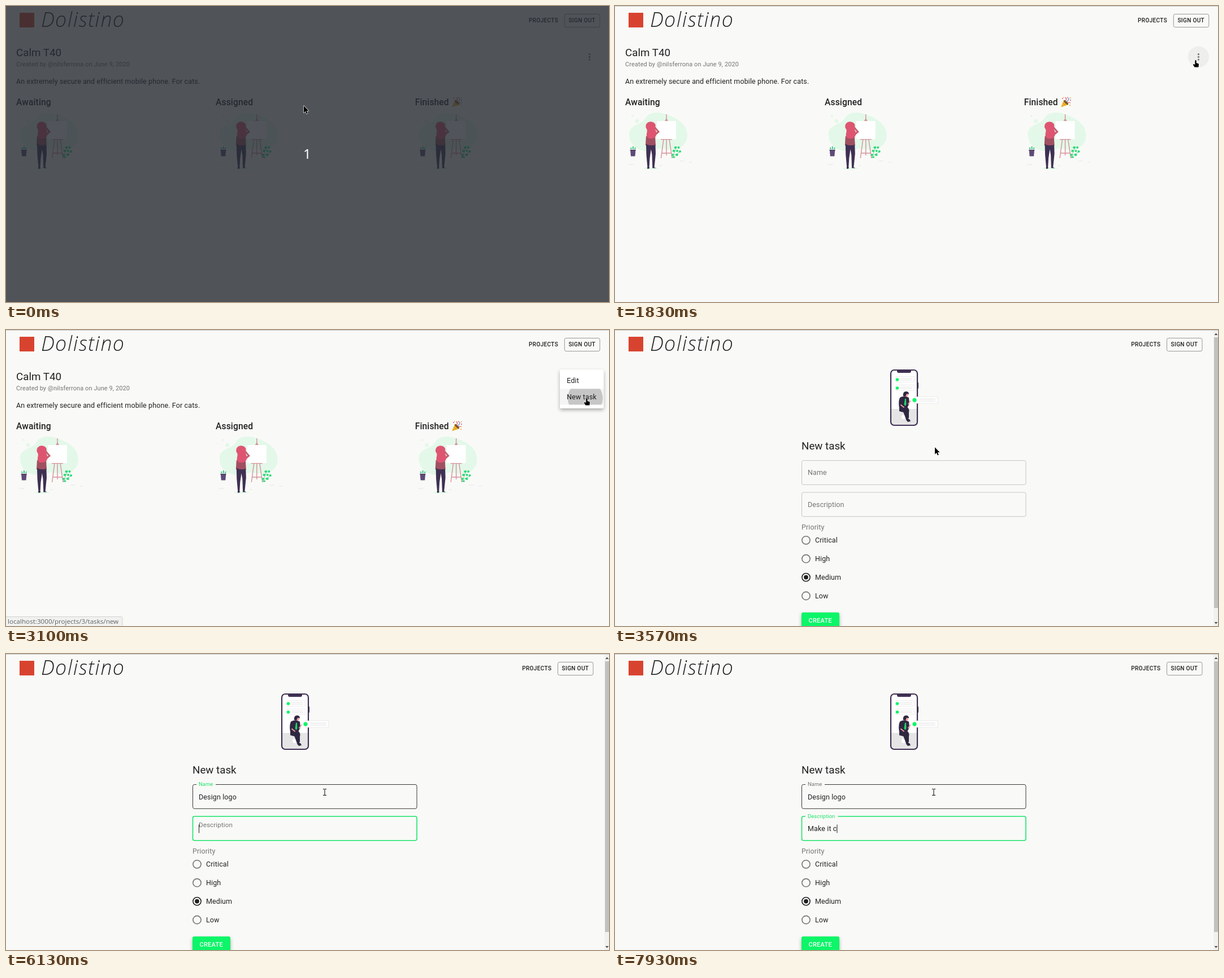
An HTML page that plays this animation: 1067 by 525 pixels, repeating every 8 s.

```html
<!DOCTYPE html>
<html lang="en">
<head>
<meta charset="utf-8">
<title>Task board</title>
<style>
  html, body { margin: 0; width: 100%; height: 100%; overflow: hidden; background: #f9faf7; }
  svg { display: block; width: 1067px; height: 525px; }
  text { font: 12.5px Roboto, sans-serif; letter-spacing: .00938em; fill: #212121; white-space: pre; }
  .h5 { font-size: 18.75px; letter-spacing: 0; }
  .h6 { font-size: 15.6px; font-weight: 500; letter-spacing: .0075em; }
  .small { font-size: 10.94px; letter-spacing: .01071em; }
  .btn { font-size: 10.15px; font-weight: 500; letter-spacing: .02857em; }
  .grey { fill: #757575; }
  .brand { font: italic 300 36px "Open Sans", sans-serif; letter-spacing: .045em; }
  .link { font: 11.67px "Open Sans", sans-serif; letter-spacing: 0; fill: #5f6266; }
</style>
</head>
<body>
<svg viewBox="0 0 1067 525">
  <defs>
    <clipPath id="itemClip"><rect x="980" y="104.3" width="77.5" height="28.2"/></clipPath>
    <filter id="shadow" x="-20%" y="-20%" width="140%" height="150%">
      <feDropShadow dx="0" dy="3" stdDeviation="3" flood-opacity=".32"/>
    </filter>

    <g id="artist">
      <path fill="#e3f8e9" d="M25 229C24 209 45 213 54 199C59 189 74 187 87 191C108 197 128 209 128 229C128 249 110 258 90 254C72 250 66 259 52 257C37 254 26 246 25 229Z"/>
      <g fill="#e3f8e9"><circle cx="39" cy="204" r="3.5"/><circle cx="31" cy="195" r="2"/><circle cx="20" cy="201" r="1"/></g>
      <path stroke="#e4e6e5" d="M24 281h9M114 275h8M131 277h5M78 283h5"/>
      <ellipse cx="64" cy="288" rx="14" ry="1.6" fill="#e3f8e9"/>
      <g stroke="#d6929a" stroke-width="1.4" fill="none">
        <path d="M91 192V265M86 236L81.500 270M96 236L101 270M83 261H99M81 236.500H101"/>
      </g>
      <path fill="#d6929a" d="M88 204L91 199L94 204Z"/>
      <rect x="74" y="204" width="34" height="32" fill="#fff"/>
      <path fill="#9f5061" d="M55 231Q63 228 71 231L72 247Q63 250 54 247Z"/>
      <path fill="none" stroke="#c2606f" stroke-width="3" stroke-linecap="round" d="M70 229L77 223L70 215"/>
      <path fill="#3f3053" d="M55 245Q63 249 71.500 246L72 262L69.500 287H66.300L65.500 264L63.800 254L61.500 270L60.500 287H57.500L55.500 264Z"/>
      <path fill="#2f2e41" d="M57 286h3.500l.5 2l-3.500 1zM66 286h3.500l3 1.500h-6z"/>
      <path fill="#de5571" d="M54.500 213C55 204 67 203 71 209C73 213 70 217 72 221C75 226 73 233 67 235Q61 236 58 234C53 229 59 222 56 218Q54 216 54.500 213Z"/>
      <path fill="#5d4a78" d="M27 255h9.500l-1 11.500h-7.500z"/>
      <path stroke="#3f3053" d="M26.500 255.500h10.500"/>
      <path stroke="#3ec487" stroke-width="2" d="M29 254l-1-3M32 254v-5M35 254l1-3"/>
      <path fill="none" stroke="#43cf81" stroke-width=".8" d="M102 269Q105 259 109 249M104 265L115 259"/>
      <g fill="#2fd878">
        <ellipse cx="107" cy="251" rx="2.500" ry="2"/><ellipse cx="112.500" cy="251" rx="2" ry="2"/>
        <ellipse cx="104" cy="257" rx="2.500" ry="2"/><ellipse cx="110" cy="257" rx="2" ry="2"/>
        <ellipse cx="115" cy="258" rx="2" ry="2"/><ellipse cx="102" cy="264" rx="2" ry="2"/>
        <ellipse cx="109.500" cy="264" rx="2.500" ry="2"/><ellipse cx="104" cy="268" rx="2.500" ry="1.500"/>
      </g>
    </g>

    <g id="row">
      <rect width="32" height="10" fill="#fff" stroke="#e6e6e6" stroke-width=".8"/>
      <path stroke="#d5d5d5" stroke-width=".7" d="M8 3.500H29M8 6.500H29"/>
      <circle cx="2.500" cy="5.500" r="2.800" fill="#10f568"/>
    </g>
  </defs>

  <rect width="1067" height="525" fill="#f9faf7"/>
  <path stroke="#c9cac8" d="M0 .5H1067"/>

  <rect x="24" y="12" width="26" height="26" fill="#d8432f"/>
  <text class="brand" x="62" y="37">Dolistino</text>
  <g id="nav">
    <text class="btn" x="925" y="29.300">PROJECTS</text>
    <rect x="988.300" y="14.400" width="62.500" height="23.200" rx="3" fill="none" stroke="#8d8d8c" stroke-width=".9"/>
    <text class="btn" x="995.400" y="29.300">SIGN OUT</text>
  </g>

  <g id="project">
    <text class="h5" x="18" y="89">Calm T40</text>
    <text class="small grey" x="18" y="106.700">Created by @nilsferrona on June 9, 2020</text>
    <text x="18" y="138">An extremely secure and efficient mobile phone. For cats.</text>
    <text class="h6" x="18" y="176">Awaiting</text>
    <text class="h6" x="371" y="176">Assigned</text>
    <text class="h6" x="723.700" y="176">Finished</text>
    <g transform="translate(789 161)">
      <path fill="#f4b92f" d="M0 18.500L5 6Q11 8 13 14Z"/>
      <path stroke="#c98518" d="M3.500 11L8 15.500M2 14.500L4.500 17"/>
      <ellipse cx="9" cy="10" rx="5.300" ry="2" transform="rotate(45 9 10)" fill="#7d5a2b"/>
      <path fill="none" stroke="#e2574f" stroke-width="1.200" d="M8 8Q11 4 8 1M12 11Q14 9 17 11"/>
      <path fill="none" stroke="#5b8fd6" stroke-width="1.200" d="M10 9Q14 7 14 2"/>
      <g fill="#c8509b"><circle cx="3" cy="3" r="1"/><circle cx="17" cy="6" r="1"/><circle cx="12" cy="1.500" r=".9"/></g>
      <g fill="#f0a52c"><circle cx="17" cy="2" r=".9"/><circle cx="16" cy="15" r="1"/><circle cx="5" cy="1" r=".8"/></g>
    </g>
    <use href="#artist"/><use href="#artist" x="352.800"/><use href="#artist" x="705.600"/>
    <circle id="hover" cx="1032.500" cy="90.300" r="18.700" opacity=".045"/>
    <circle id="press" cx="1032.500" cy="90.300" opacity=".15"/>
    <g class="grey"><circle cx="1032.500" cy="85.600" r="1.600"/><circle cx="1032.500" cy="90.300" r="1.600"/><circle cx="1032.500" cy="95" r="1.600"/></g>
    <g id="menu">
      <rect x="980" y="70" width="77.500" height="69" rx="3" fill="#fff" filter="url(#shadow)"/>
      <rect id="active" x="980" width="77.500" height="28.200" opacity=".045"/>
      <g clip-path="url(#itemClip)"><circle id="ripple" cx="1025" cy="121" opacity=".19"/></g>
      <text x="992.300" y="94.300">Edit</text>
      <text x="992.300" y="122.500">New task</text>
    </g>
  </g>

  <g id="form">
    <rect x="1059" y="1" width="8" height="524" fill="#f1f1f1"/>
    <rect x="1060" y="13" width="7" height="480" fill="#c1c1c1"/>
    <path fill="#505050" d="M1060.500 9L1063.500 5.500L1066.500 9ZM1060.500 518L1063.500 521.500L1066.500 518Z"/>

    <rect x="534" y="93" width="3" height="11" rx="1" fill="#3f3053"/>
    <rect x="488" y="71" width="47" height="98" rx="6" fill="#fff"/>
    <path fill="#e5e5e5" d="M488 140H535V163Q535 169 529 169H494Q488 169 488 163Z"/>
    <rect x="488" y="71" width="47" height="98" rx="6" fill="none" stroke="#3f3053" stroke-width="2.200"/>
    <path fill="#3f3053" d="M499 70H524V73Q524 76 521 76H502Q499 76 499 73Z"/>
    <use href="#row" x="497" y="82.500"/><use href="#row" x="497" y="97.500"/>
    <circle cx="511" cy="154" r="4" fill="#fff"/>
    <g fill="#2f2740">
      <path d="M504 120Q512 115 520 120L521 130L517 138H503Q501 127 504 120Z"/>
      <path d="M503 136H516Q522 140 520 146L520 156L517 157L514 147L503 144Z"/>
      <path d="M510 145L515 147L520 159L516 161Z"/>
      <path d="M515 159L521 158L523 162L518 163Z"/>
    </g>
    <path stroke="#f3a3a6" stroke-width="1.800" stroke-linecap="round" d="M519 131L523 126M506 133L511 137"/>
    <path fill="#20d56b" d="M513 122L515 122L515.500 132L513.500 135L511.500 132Z"/>
    <circle cx="515.500" cy="115" r="3.300" fill="#f3a3a6"/>
    <path fill="#2f2740" d="M510 117Q509 109 515 109Q520 109 520 114L516 113L514 118Z"/>
    <rect x="529" y="118.500" width="42" height="11.500" fill="#fff" stroke="#e6e6e6" stroke-width=".8"/>
    <path stroke="#d5d5d5" stroke-width=".8" d="M538 122.500H567M538 126H567"/>
    <circle cx="530" cy="124.300" r="3.600" fill="#10f568"/>

    <text class="h5" x="330" y="212">New task</text>
    <g id="fields"></g>
    <text class="grey" x="330" y="354">Priority</text>
    <g id="radios"></g>
    <rect x="330" y="501" width="67" height="28" rx="3" fill="#10f568" filter="url(#shadow)"/>
    <text class="btn" x="342.500" y="518.500" style="font-size:10.94px;fill:#fff">CREATE</text>
  </g>

  <g id="status">
    <path id="statusBar" fill="#f1f2f0" stroke="#d2d3d1"/>
    <text id="statusText" class="link" x="3" y="521"></text>
  </g>

  <g id="countdown">
    <rect width="1067" height="525" fill="#262b33" opacity=".8"/>
    <text x="533" y="271" text-anchor="middle" style="font:24px 'Noto Sans',sans-serif;fill:#fff">1</text>
  </g>

  <path id="cursor" stroke-width="1.200" stroke-linejoin="round" paint-order="stroke"/>
</svg>

<script>
const $ = id => document.getElementById(id);
const set = (el, attrs) => { for (const k in attrs) el.setAttribute(k, attrs[k]); };
const show = (el, on) => el.style.display = on ? '' : 'none';
const clamp = v => Math.min(1, Math.max(0, v));
const easeOut = v => 1 - (1 - clamp(v)) ** 3;
const mix = (a, b, p) => a + (b - a) * p;
const mixColor = (a, b, p) => `rgb(${a.map((v, i) => Math.round(mix(v, b[i], p)))})`;

const GREEN = [27, 228, 106], GREY = [117, 117, 117];
const LOOP = 8000, MENU = 1930, FORM = 3130, NAME = 4100, TAB = 6130;

// [start, end, steps, x, y]
const moves = [
  [930, 1670, 11, 1025, 87],
  [1830, 1830, 1, 1028, 96],
  [2370, 2570, 6, 1028, 121],
  [3400, 3570, 5, 566, 208],
  [3800, 3900, 3, 564, 245]
];
const cursors = {
  arrow: 'M0 0V12.500L2.800 9.800L4.900 14.200L6.800 13.300L4.800 9H8.600Z',
  hand: 'M-1.700 1Q-1.700 0 -.6 0Q.6 0 .7 1V5L4 6Q5.200 6.400 5 8L4.500 12.500H-2.500L-5 8.500Q-5.300 7 -3.800 7L-1.700 8Z',
  beam: 'M-3 -6H-.5V5H-3V6H3V5H.5V-6H3V-5H-3Z'
};

function cursorAt(t) {
  let x = 527, y = 177;
  for (const [start, end, n, toX, toY] of moves) {
    if (t < start) break;
    const step = end > start ? Math.floor((t - start) / (end - start) * (n - 1)) + 1 : n;
    const p = clamp(step / n), s = p * p * (3 - 2 * p);
    x = mix(x, toX, s);
    y = mix(y, toY, s);
  }
  return [x, y];
}

const typed = (text, times, t) => text.slice(0, times.filter(at => t >= at).length);

function makeField(label, top, notch) {
  const g = document.createElementNS('http://www.w3.org/2000/svg', 'g');
  g.innerHTML = `<rect x="330.500" y="${top}" width="396.500" height="42.800" rx="3" fill="none"/>
    <rect x="337" y="${top - 2}" width="${notch}" height="4" fill="#f9faf7"/>
    <text>${label}</text><text x="341" y="${top + 26.2}"></text>
    <rect y="${top + 14.5}" width="1" height="15" fill="#212121"/>`;
  $('fields').append(g);
  const [box, gap, tag, value, caret] = g.children;
  return ({ lift, color, focused, hovered, text, blink }) => {
    set(box, {
      stroke: focused ? `rgb(${GREEN})` : hovered ? '#212121' : '#c0c1be',
      'stroke-width': focused ? 1.6 : .9
    });
    show(gap, lift > .5);
    set(tag, { transform: `translate(341 ${top + mix(25.8, 2.6, lift)}) scale(${mix(1, .75, lift)})` });
    tag.style.fill = color;
    value.textContent = text;
    show(caret, focused && !blink);
    set(caret, { x: 341 + (text ? value.getComputedTextLength() : 0) });
  };
}
const nameField = makeField('Name', 231.5, 34);
const descField = makeField('Description', 288, 57.5);

$('radios').innerHTML = ['Critical', 'High', 'Medium', 'Low'].map((label, i) => {
  const y = 372.8 + i * 32.9, on = label === 'Medium', color = on ? '#212121' : '#757575';
  return `<circle cx="338" cy="${y}" r="7.100" fill="none" stroke="${color}" stroke-width="1.600"/>
    ${on ? `<circle cx="338" cy="${y}" r="3.900" fill="${color}"/>` : ''}
    <text x="354" y="${y + 4.2}">${label}</text>`;
}).join('');

const nameKeys = [4370, 4470, 4600, 4700, 4800, 4900, 5030, 5200, 5300, 5400, 5500];
const descKeys = [6870, 7070, 7142, 7214, 7286, 7358, 7358, 7430, 7930];

function drawProject(t, y) {
  const open = easeOut((t - MENU) / 200), onNew = y > 104;
  show($('hover'), t >= 1830);
  set($('press'), { r: t < 1860 ? 0 : mix(6, 18.7, easeOut((t - 1860) / 250)) });
  show($('menu'), t >= MENU);
  set($('menu'), {
    opacity: open,
    transform: `translate(1032 90) scale(${mix(.75, 1, open)} ${mix(.56, 1, open)}) translate(-1032 -90)`
  });
  set($('active'), { y: onNew ? 104.3 : 76.2 });
  set($('ripple'), { r: t < 2870 ? 0 : mix(8, 31, clamp((t - 2870) / 230)) });
}

function drawForm(t, y) {
  // Labels are already slightly under way when a focus change first shows.
  const lift = at => t < at ? 0 : easeOut((t - at + 20) / 200);
  const fade = at => clamp((t - at) / 200);
  nameField({
    lift: lift(NAME),
    color: t < TAB ? mixColor(GREY, GREEN, fade(NAME)) : mixColor(GREEN, GREY, fade(TAB)),
    focused: t >= NAME && t < TAB,
    hovered: y > 231,
    text: typed('Design logo', nameKeys, t)
  });
  descField({
    lift: lift(TAB),
    color: mixColor(GREY, GREEN, fade(TAB)),
    focused: t >= TAB,
    text: typed('Make it c', descKeys, t),
    blink: t >= 6700 && t < 6870
  });
}

function draw(t) {
  const [x, y] = cursorAt(t), onForm = t >= FORM;
  show($('project'), !onForm);
  show($('form'), onForm);
  set($('nav'), { transform: `translate(${onForm ? -11.8 : 0} 0)` });
  if (onForm) drawForm(t, y); else drawProject(t, y);

  const onNew = t >= 2370 && y > 104;
  show($('status'), t >= 2100 && t < 3400);
  set($('statusBar'), { d: `M-1 508.500H${onNew ? 203 : 169}q3 0 3 3V526H-1Z` });
  $('statusText').textContent = 'localhost:3000/projects/3/' + (onNew ? 'tasks/new' : 'edit');

  show($('countdown'), t < 30);
  const kind = t >= 1830 && t < 3400 ? 'hand' : t >= 3800 && y > 231 ? 'beam' : 'arrow';
  set($('cursor'), {
    d: cursors[kind],
    transform: `translate(${x} ${y})`,
    stroke: kind === 'beam' ? 'none' : '#fff'
  });
}

const begin = performance.now();
function tick() {
  draw((performance.now() - begin) % LOOP);
  requestAnimationFrame(tick);
}
tick();
</script>
</body>
</html>
```
